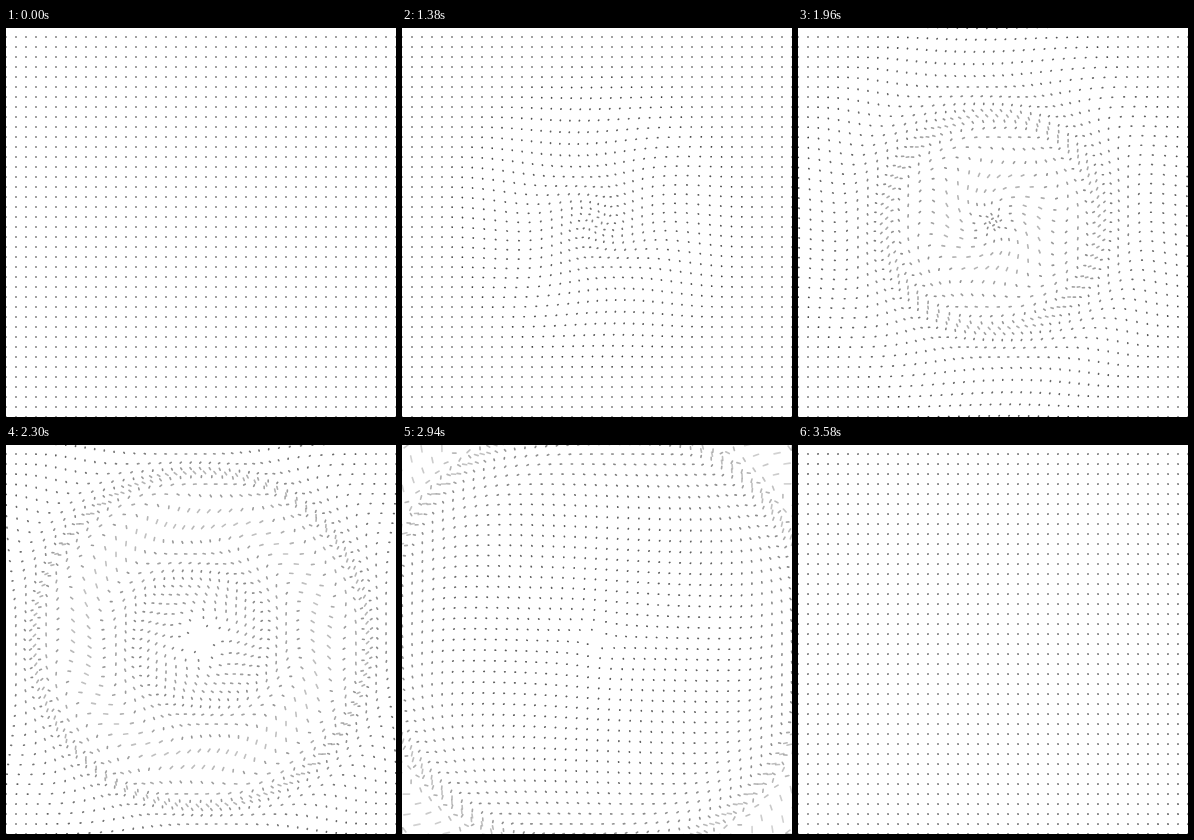
Recreate the animation shown at these times as an HTML page with a canvas. Size 390 by 389 pixels, loop 3600 ms.

```html
<!DOCTYPE html>
<html lang="en">
<head>
<meta charset="utf-8">
<title>Dot ripple</title>
<style>
html, body { margin: 0; width: 100%; height: 100%; overflow: hidden; background: #fff; }
canvas { display: block; width: 390px; height: 389px; }
</style>
</head>
<body>
<canvas id="stage" width="390" height="389"></canvas>
<script>
const ctx = document.getElementById("stage").getContext("2d");
const LOOP = 3600, SHUTTER = 20;
const CX = 195, CY = 194, GAP = 10;
const REACH = 10;   // largest shift along the radius, px
const SWAY = 5;     // largest shift across the radius, px
const SIZE = 1.65;

const ease = p => p < 0.5 ? 4 * p ** 3 : 1 - 4 * (1 - p) ** 3;
const clamp = (v, lo, hi) => Math.min(hi, Math.max(lo, v));

// Farther dots start later; all of them settle at the end of the loop.
const dots = [];
for (let j = -23; j < 23; j++) {
  for (let i = -23; i < 23; i++) {
    const dx = (i + 0.5) * GAP, dy = (j + 0.5) * GAP;
    const r = Math.hypot(dx, dy);
    dots.push({
      x: CX + dx, y: CY + dy,
      ux: dx / r, uy: dy / r,
      delay: Math.min(2520 * (r / 275) ** 1.12, 3200)
    });
  }
}

// Each dot runs twice round a figure of eight that lies along its radius.
function place(dot, t) {
  const p = clamp((t - dot.delay) / (LOOP - dot.delay), 0, 1);
  const turn = 4 * Math.PI * ease(p);
  const out = -REACH * Math.sin(turn);
  const side = -SWAY * Math.sin(2 * turn);
  return [
    dot.x + dot.ux * out - dot.uy * side,
    dot.y + dot.uy * out + dot.ux * side
  ];
}

function draw(t) {
  ctx.globalAlpha = 1;
  ctx.fillStyle = "#fff";
  ctx.fillRect(0, 0, 390, 389);
  ctx.strokeStyle = "#2c2c2c";
  ctx.lineWidth = SIZE;
  ctx.lineCap = "round";
  for (const dot of dots) {
    const [x1, y1] = place(dot, t - SHUTTER / 2);
    const [x2, y2] = place(dot, t + SHUTTER / 2);
    // a smeared dot spreads its ink along the path
    ctx.globalAlpha = SIZE / (SIZE + Math.hypot(x2 - x1, y2 - y1));
    ctx.beginPath();
    ctx.moveTo(x1, y1);
    ctx.lineTo(x2 + 0.01, y2);
    ctx.stroke();
  }
}

const start = performance.now();
function tick() {
  draw((performance.now() - start) % LOOP);
  requestAnimationFrame(tick);
}
draw(0);
requestAnimationFrame(tick);
</script>
</body>
</html>
```
